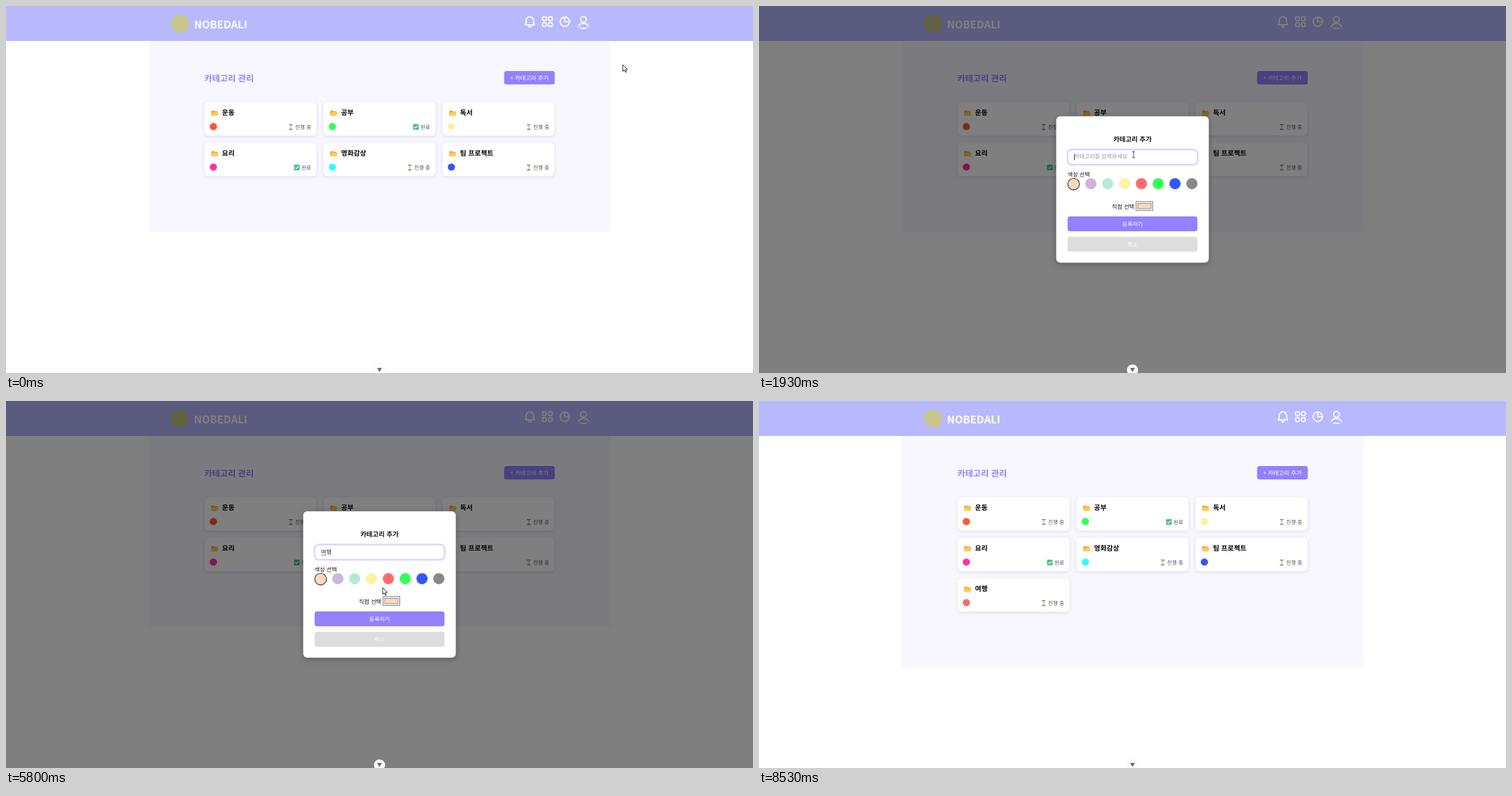
These frames come from a looping animation (1067x525 px, 8800 ms). An HTML page:

```html
<!DOCTYPE html>
<html lang="ko">
<head>
<meta charset="utf-8">
<style>
  html, body { margin: 0; height: 100%; overflow: hidden; background: #fff; }
  svg { display: block; width: 1067px; height: 525px; font-family: "Noto Sans CJK KR", "Noto Sans CJK", "Noto Sans", sans-serif; }
  .card { fill: #fff; filter: drop-shadow(0 1px 2px rgba(0, 0, 0, .12)); }
  .dialog { fill: #fff; filter: drop-shadow(0 2px 4px rgba(0, 0, 0, .3)); }
  .icon { fill: none; stroke: #fff; stroke-width: 1.7; stroke-linecap: round; stroke-linejoin: round; }
</style>
</head>
<body>
<svg id="stage" viewBox="0 0 1067 525" text-rendering="geometricPrecision"></svg>
<script>
const LOOP = 8800, OPEN = 1330, FOCUS = 1930, PICK = 6265, CLOSE = 7070;
const stage = document.getElementById('stage');

const rect = (x, y, w, h, fill, r = 0, extra = '') =>
  `<rect x="${x}" y="${y}" width="${w}" height="${h}" rx="${r}" fill="${fill}" ${extra}/>`;
const circle = (x, y, r, fill, extra = '') => `<circle cx="${x}" cy="${y}" r="${r}" fill="${fill}" ${extra}/>`;
const path = (d, extra = '') => `<path d="${d}" ${extra}/>`;
const at = (x, y, body) => `<g transform="translate(${x} ${y})">${body}</g>`;
// Text is placed by the vertical middle of its glyphs.
const text = (x, midY, size, str, fill, weight = 400, anchor = 'start') =>
  `<text x="${x}" y="${midY + size * .37}" font-size="${size}" fill="${fill}" font-weight="${weight}" text-anchor="${anchor}">${str}</text>`;
const caret = (x, y, h) => rect(x, y, .8, h, '#222');

const folder = path('M0 1.2Q0 .3.9.3H3.4L4.6 1.5H8.2Q9 1.5 9 2.3V7.5H0Z', 'fill="#f2a63b"') +
  path('M1.7 3H9.6Q10.3 3 10.1 3.7L9.2 7.4Q9 8.1 8.3 8.1H.8Q0 8.1.2 7.3Z', 'fill="#ffcb55"');
const hourglass = path('M.8.8H5.2C5.2 3 3.5 3.5 3.5 4.1S5.2 5.4 5.2 7.4H.8C.8 5.4 2.5 4.8 2.5 4.1S.8 3 .8.8Z', 'fill="#c9dde3"') +
  path('M1.5 2.2H4.5L3 4V5.4L4.6 7.2H1.4L3 5.4V4Z', 'fill="#e2ac55"') +
  rect(.2, 0, 5.6, 1, '#8d6b55', .4) + rect(.2, 7.2, 5.6, 1, '#8d6b55', .4);
const check = rect(0, 0, 8, 8, '#48bf83', 1) +
  path('M1.9 4.1 3.4 5.7 6.3 2.3', 'fill="none" stroke="#fff" stroke-width="1.2"');

const cards = [
  ['운동', '#ff5733'], ['공부', '#33ff57', true], ['독서', '#fff1a5'],
  ['요리', '#ff33a1', true], ['영화감상', '#33fff5'], ['팀 프로젝트', '#3357ff'],
  ['여행', '#ff6b6b']
];
const swatches = ['#ffd8be', '#cdb4db', '#b5ead7', '#fff1a5', '#ff6b6b', '#33ff57', '#3357ff', '#888888'];

function card([name, color, done], i) {
  return at(283.5 + i % 3 * 170, 137.5 + Math.floor(i / 3) * 58,
    rect(0, 0, 160, 48, '#fff', 5.5, 'class="card"') + at(9.7, 11.6, folder) +
    text(25, 15.2, 9.78, name, '#000', 700) + circle(12.7, 34.9, 5.2, color) +
    text(152.4, 35.4, 7.56, done ? '완료' : '진행 중', '#555', 400, 'end') +
    (done ? at(128, 31.5, check) : at(120.2, 31.5, hourglass)));
}

const header = rect(0, 0, 1067, 50, '#b8b8ff') + circle(248.5, 25.3, 13, '#c8c68c') +
  text(268.5, 26, 15.06, 'NOBEDALI', '#fff', 700) +
  '<g class="icon">' +
  path('M741.7 26.8H755C753.3 24.8 753.6 23 753.5 20.5A5.2 5.2 0 0 0 743.1 20.5C743.1 23 743.4 24.8 741.7 26.8ZM746.4 28.8A2 2 0 0 0 750.2 28.8') +
  [[766.4, 15.4], [774.9, 15.4], [766.4, 23.9], [774.9, 23.9]].map(([x, y]) => rect(x, y, 5.4, 5.4, 'none', 1.8)).join('') +
  circle(798.2, 22.5, 6.7, 'none') + path('M798.2 15.8V22.5H804.9') +
  circle(824.8, 19.2, 4.1, 'none') + path('M817.6 29.2C819.3 23.6 830.3 23.6 832 29.2M820.8 31.5Q824.8 33 828.8 31.5') + '</g>';

function page(count) {
  return rect(0, 0, 1067, 525, '#fff') + rect(203.5, 50, 660, count > 6 ? 331.5 : 273, '#f8f7ff') + header +
    text(283.3, 103.3, 12.2, '카테고리 관리', '#9381ff', 700) +
    rect(711.5, 93, 72.3, 19.2, '#9381ff', 3.5) +
    text(747.5, 103, 8.3, '+ 카테고리 추가', '#fff', 500, 'middle') +
    cards.slice(0, count).map(card).join('');
}

function typed(t) {
  const stages = [[4870, '여행'], [4730, '여해'], [4670, '옇'], [4330, '여'], [2670, 'ㅇ'], [FOCUS, '']];
  return stages.find(([start]) => t >= start) || [0, ''];
}

function inputBox(t) {
  const focused = t >= FOCUS && t < PICK;
  const [since, value] = typed(t);
  let out = focused
    ? rect(440.4, 204.9, 186.4, 22.6, '#fff', 6.5, 'stroke="#dcdcff" stroke-width="2"') +
      rect(441.3, 205.8, 184.6, 20.8, '#fff', 6, 'stroke="#b8b8ff" stroke-width=".6"')
    : rect(441, 205.5, 185.3, 21.3, '#f4f4f4', 6, 'stroke="#ddd" stroke-width=".7"');
  out += value ? text(450, 216.2, 8.1, value, '#222') : text(450, 215.4, 8.06, '카테고리를 입력하세요', '#999');
  if (focused && t >= 4730) out += rect(450.3, 220.5, 7, .6, '#333');
  if (focused && (t - since) % 1060 < 530) out += caret(450.1 + value.length * 7.35, 211.5, 9.3);
  return out;
}

function palette(selected) {
  let x = 440.8;
  return swatches.map((color, i) => {
    const on = i === selected, d = on ? 17.2 : 16;
    const dot = circle(x + d / 2, 246.2 + d / 2, on ? d / 2 - .3 : 8, color, on ? 'stroke="#333" stroke-width="1.1"' : '');
    x += d + 8.04;
    return dot;
  }).join('');
}

function dialog(t, hover) {
  const selected = t < PICK ? 0 : 4;
  return rect(0, 0, 1067, 525, '#000', 0, 'opacity=".5"') +
    rect(424.5, 157.7, 218, 209.5, '#fff', 6, 'class="dialog"') +
    text(533.5, 190.3, 9.45, '카테고리 추가', '#111', 700, 'middle') + inputBox(t) +
    text(440.8, 240.8, 8.06, '색상 선택', '#111') + palette(selected) +
    text(504, 287, 8.1, '직접 선택', '#111') +
    rect(538.4, 279.8, 24.2, 12.6, '#efefef', 0, 'stroke="#767676" stroke-width=".8"') +
    rect(541, 282.5, 19, 7.4, swatches[selected], 0, 'stroke="#777" stroke-width=".7"') +
    rect(440.8, 301, 185.5, 21.2, hover ? '#776ddf' : '#9381ff', 3.5) +
    text(533.5, 312, 8, '등록하기', '#fff', 500, 'middle') +
    rect(440.8, 330.2, 185.5, 21.2, '#ddd', 3.5) +
    text(533.5, 341.2, 8, '취소', '#fff', 500, 'middle');
}

const outline = 'fill="#fff" stroke="#000" stroke-width=".8" stroke-linejoin="round"';
const cursors = {
  arrow: path('M0 0V9.6L2.2 7.5 3.7 10.8 5.2 10.1 3.8 6.9H6.7Z', outline),
  hand: path('M-1 .8A1 1 0 0 1 1 .8V4.5L4.6 5.3Q6 5.7 5.9 7.2L5.3 10 4.3 12.3H-.5L-3.7 7.7C-4.3 6.5-2.9 5.9-2.1 6.7L-1 7.8Z', outline),
  beam: path('M-2-4.3H-.5L0-4 .5-4.3H2M0-4V4M-2 4.3H-.5L0 4 .5 4.3H2', 'fill="none" stroke="#222" stroke-width=".8"')
};
// Time, x and y of the pointer; it moves straight between these points.
const track = [
  [0, 881, 84], [66, 882, 83], [200, 882, 83], [733, 762, 99], [1400, 762, 98.5],
  [1800, 545, 229], [1933, 535, 212.5], [5333, 535, 212.5], [5800, 538, 267], [5933, 541, 297],
  [6200, 546, 248], [6267, 546, 248], [6600, 558, 320], [6667, 556, 306.5], [7000, 556, 306.5], [7400, 580, 540]
];

function pointer(t) {
  const time = Math.floor((t + 4) * .015) / .015; // 15 positions a second
  const i = track.findIndex(([end]) => end > time);
  if (i < 0) return track[track.length - 1].slice(1);
  const [t0, x0, y0] = track[i - 1], [t1, x1, y1] = track[i];
  const k = (time - t0) / (t1 - t0);
  return [x0 + (x1 - x0) * k, y0 + (y1 - y0) * k];
}

function scene(t) {
  const open = t >= OPEN && t < CLOSE;
  const [x, y] = pointer(t);
  const inside = (left, top, right, bottom) => x >= left && x <= right && y >= top && y <= bottom;
  const submit = open && inside(441, 301, 626, 322);
  let kind = 'arrow';
  if (open) {
    if (inside(441, 205, 626, 227)) kind = 'beam';
    else if (inside(538, 246, 554, 262) || submit && t < 6930) kind = 'hand';
  } else if (t < OPEN && inside(711, 93, 784, 112)) kind = 'hand';

  let out = page(t < CLOSE ? 6 : 7);
  if (t >= 1270 && t < OPEN) out += caret(291, 226, 10.5);
  if (t >= CLOSE && t < 7600 || t >= 8130 && t < 8530) out += caret(434.1, 283.2, 10.5);
  if (open) out += dialog(t, submit);
  out += circle(533.5, 520.7, 8, '#fff', 'stroke="#000" stroke-opacity=".1" stroke-width=".6"') +
    path('M530 517.8H537L533.5 523.6Z', 'fill="#666"');
  return out + at(x, y, cursors[kind]);
}

let shown;
function frame() {
  const next = scene(performance.now() % LOOP);
  if (next !== shown) stage.innerHTML = shown = next;
  requestAnimationFrame(frame);
}
frame();
</script>
</body>
</html>
```
